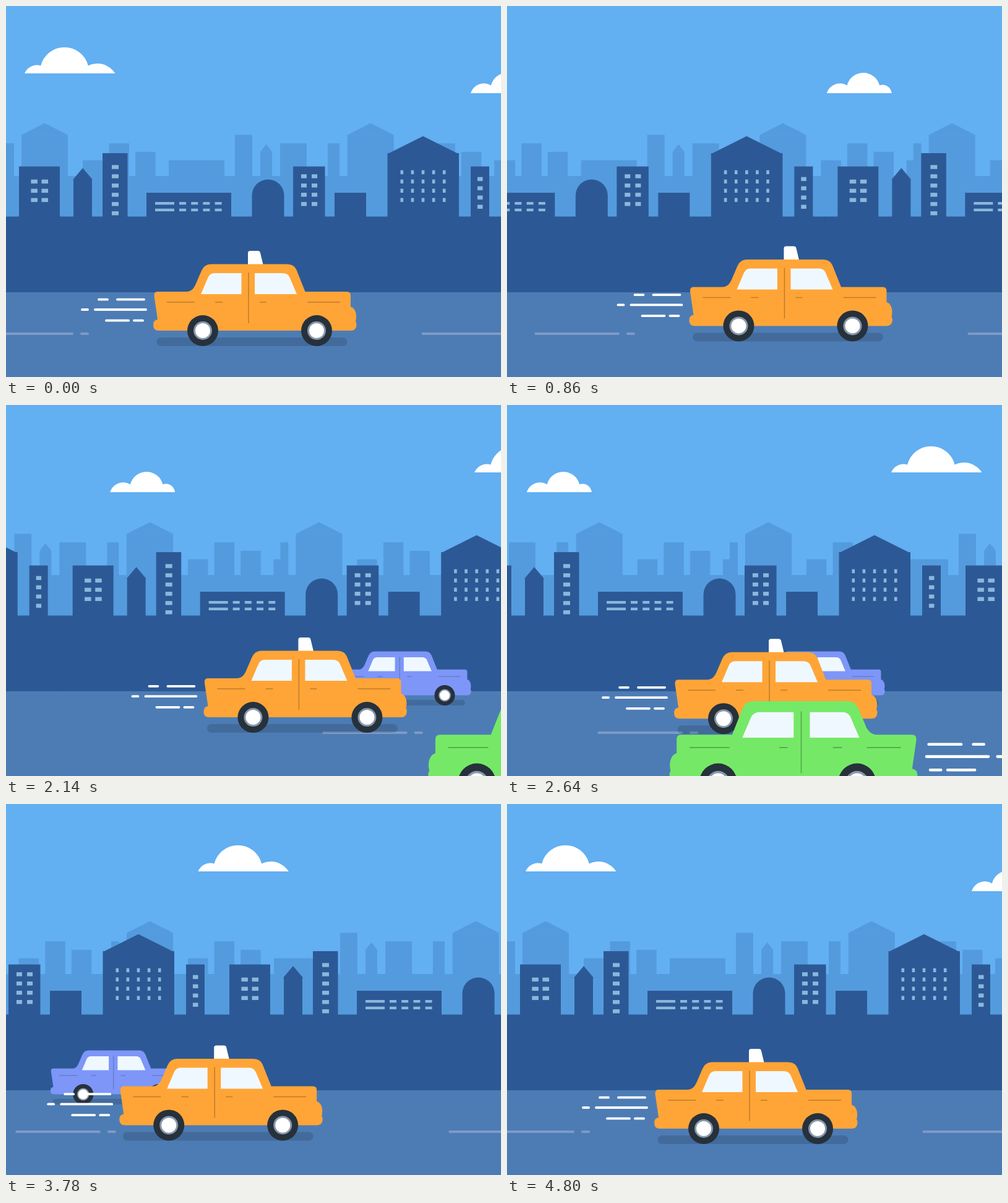
Recreate the animation shown at these times as an HTML page. Size 800x600 px, loop 4.82 s.

```html
<!DOCTYPE html>
<html lang="en">
<head>
<meta charset="utf-8">
<title>City taxi</title>
<style>
  html, body { margin: 0; width: 100%; height: 100%; overflow: hidden; background: #62aff2; }
  svg { display: block; width: 800px; height: 600px; }
</style>
</head>
<body>
<svg id="stage" viewBox="0 0 800 600" xmlns="http://www.w3.org/2000/svg"></svg>
<script>
const LOOP = 4820, END = 4800, STEP = 20, WIDTH = 800;

const rect = (x, y, w, h, extra = '') => `<rect x="${x}" y="${y}" width="${w}" height="${h}" ${extra}/>`;
const circle = (x, y, r, fill) => `<circle cx="${x}" cy="${y}" r="${r}" fill="${fill}"/>`;
const path = (d, extra = '') => `<path d="${d}" ${extra}/>`;
const group = (id, body, attrs = '') => `<g id="${id}" ${attrs}>${body}</g>`;
const repeat = (n, make) => Array.from({ length: n }, (_, i) => make(i)).join('');
const tiled = (body, width) => repeat(3, i => `<g transform="translate(${i * width})">${body}</g>`);
const strokes = (d, color, width) =>
  path(d, `stroke="${color}" stroke-width="${width}" stroke-linecap="round"`);

// Roof of the given rise above a box
const gable = (x, y, w, rise) => path(`M${x} ${y}l${w / 2} ${-rise}l${w / 2} ${rise}z`);

// Far skyline: every height is a whole number of storeys
function farCity() {
  const block = (x, w, storeys, rise = 0) => {
    const top = 263.2 - 13.7 * storeys;
    return rect(x, top, w, 276 - top) + gable(x, top, w, rise);
  };
  const row = x => block(x + 25, 75, 4, 19) +
    [1, 3, 2].map((n, i) => block(x + 124 + 42.6 * i, 32.4, n)).join('');
  return rect(0, 275, 801, 70) + row(0) + row(526.7) +
    block(0, 13, 3) + block(263, 90, 1) + block(370, 28, 4) + block(411, 19, 2, 12) +
    block(443, 43, 3) + block(520, 19, 3) + block(789, 12, 1);
}

// Near skyline: windows are centred and counted upwards from the lowest row
function nearCity() {
  const block = (x, w, top) => rect(x, top, w, 341 - top);
  const panes = (cx, lowest, cols, rows, w) => repeat(cols, c => repeat(rows, r =>
    rect(cx + (c - (cols - 1) / 2) * 17.1 - w / 2, lowest - r * 14.95, w, 6.4)));
  const strips = y => rect(241, y, 31, 4.3) + repeat(4, i => rect(280 + 19.2 * i, y, 11, 4.3));
  return rect(0, 340.5, 801, 122.5) +
    block(21, 66, 259.5) + block(109, 30, 281) + gable(108, 281, 32, 19) + block(156, 40.5, 238) +
    block(227, 137, 302) + path('M397.500 341V306.500a26 26 0 0 1 52 0V341z'.replace(/00\b/g, '')) +
    block(464, 51.5, 259.5) + block(531, 51, 302) +
    block(616.5, 115.5, 238) + gable(619, 238, 110, 27.5) + block(751, 30, 259.5) +
    '<g fill="#8ab7dc">' + panes(54.2, 310.6, 2, 3, 10.5) + panes(176.5, 332, 1, 6, 11) +
    panes(490, 317, 2, 4, 9) + panes(674, 310.5, 5, 4, 4.6) + panes(766.2, 321.5, 1, 4, 8.5) +
    strips(317) + strips(327.7) + '</g>';
}

function car(color, shade, { sign, trail }) {
  const wheel = x => circle(x, 525, 25, '#27313c') + circle(x, 525, 15, '#8898a9') + circle(x, 525, 12, '#fff');
  const streaks = 'M150 474.7h14M180 474.7h43M123 491h9M144 491h82M162 508.7h36M207 508.7h14';
  const shell = 'M245 462H291C300 462 304 456 307 449L316 428Q320.5 417.5 331 417.5H453C463 417.5 467 421 470 428' +
    'L483.5 462H551Q557 462 557 468V486.5C563 488 566 495 566 502Q566 507 565 510Q566.5 512 566.5 515.5' +
    'Q566 525 557 525H247Q238 525 238 516Q238 508 245 507L239.5 469Q239 462 245 462z';
  const glass = 'M315 466L326.5 439Q329.5 432 337 432H380.5V466zM402 466V432H447Q455.5 432 458.5 439L470 466z';
  const seams = 'M392 431V513M260 479h45M338 479h12M410 479h11M487 479h53';
  return rect(243.5, 536, 308, 14, 'rx="7" fill="#000" fill-opacity=".14"') +
    (trail ? strokes(streaks, '#fff', 3.8) : '') +
    (sign ? path('M391 418V399.5q0-3.5 3.5-3.5H407q3.3 0 4 3.2L415.5 418z', 'fill="#fff"') : '') +
    path(shell, `fill="${color}"`) + path(glass, 'fill="#f0f8ff"') +
    path(seams, `stroke="${shade}" stroke-width="1.5"`) + wheel(318) + wheel(502);
}

const stage = document.getElementById('stage');
stage.innerHTML =
  rect(0, 0, WIDTH, 600, 'fill="#62aff2"') +
  group('bigCloud', path('M0 109A21.6 21.6 0 0 1 26.2 96.5A39.5 39.5 0 0 1 102.8 96.5A34 34 0 0 1 146.5 109z'), 'fill="#fff"') +
  group('smallCloud', path('M0 141A22.2 22.2 0 0 1 32.8 128.5A27 27 0 0 1 85.2 128.3A15 15 0 0 1 105 141z'), 'fill="#fff"') +
  group('far', tiled(farCity(), WIDTH), 'fill="#549bde"') +
  group('near', tiled(nearCity(), WIDTH), 'fill="#2c5995"') +
  rect(0, 463, WIDTH, 137, 'fill="#4d7cb5"') +
  group('road', tiled(strokes('M-26.5 530h133.5M122 530h10', '#7d9ac6', 4), 700)) +
  group('purple', car('#7d96f8', '#5e70ba', {})) +
  group('taxi', car('#ffa537', '#bf7c29', { sign: true, trail: true })) +
  group('green', car('#75e967', '#58af4d', { trail: true }));

const parts = {};
for (const g of stage.querySelectorAll('g[id]')) parts[g.id] = g;
const place = (id, x, y = 0, scale = '') =>
  parts[id].setAttribute('transform', `translate(${x.toFixed(3)} ${y.toFixed(3)}) ${scale}`);

// cubic-bezier(.42, 0, .58, 1), solved by bisection
function easeInOut(p) {
  let lo = 0, hi = 1;
  for (let i = 0; i < 20; i++) {
    const s = (lo + hi) / 2, r = 1 - s;
    if (1.26 * s * r * r + 1.74 * s * s * r + s * s * s < p) lo = s; else hi = s;
  }
  return lo * lo * (3 - 2 * lo);
}

// Eased value between [time, value] keys
function track(keys, t) {
  const i = Math.max(1, keys.findIndex(k => k[0] >= t));
  const [t0, a] = keys[i - 1], [t1, b] = keys[i];
  return a + (b - a) * easeInOut((t - t0) / (t1 - t0));
}

const taxiX = [[0, 0], [1600, 100], [3840, -55], [END, 0]];
const taxiY = [[0, 0], [2000, -20], [END, 0]];

// Clouds leave on the left and come back after a fixed span
const drift = (x, t) => (x - 0.2724 * t + 1510) % 1310 - 200;

function draw(t) {
  place('bigCloud', drift(30, t));
  place('smallCloud', drift(751, t));
  place('far', -t / 6);
  place('near', -t / 3 % WIDTH);
  place('road', -t * 3500 / END % 700);
  place('purple', 980.2 - 0.282 * t, 122, 'scale(.662)');
  place('taxi', track(taxiX, t), track(taxiY, t));
  place('green', 3170 - 0.8395 * t, -30.4, 'scale(-1.22 1.22)');
}

const start = performance.now();
function tick() {
  const t = Math.floor((performance.now() - start) % LOOP / STEP) * STEP;
  draw(t % END);
  requestAnimationFrame(tick);
}
tick();
</script>
</body>
</html>
```
